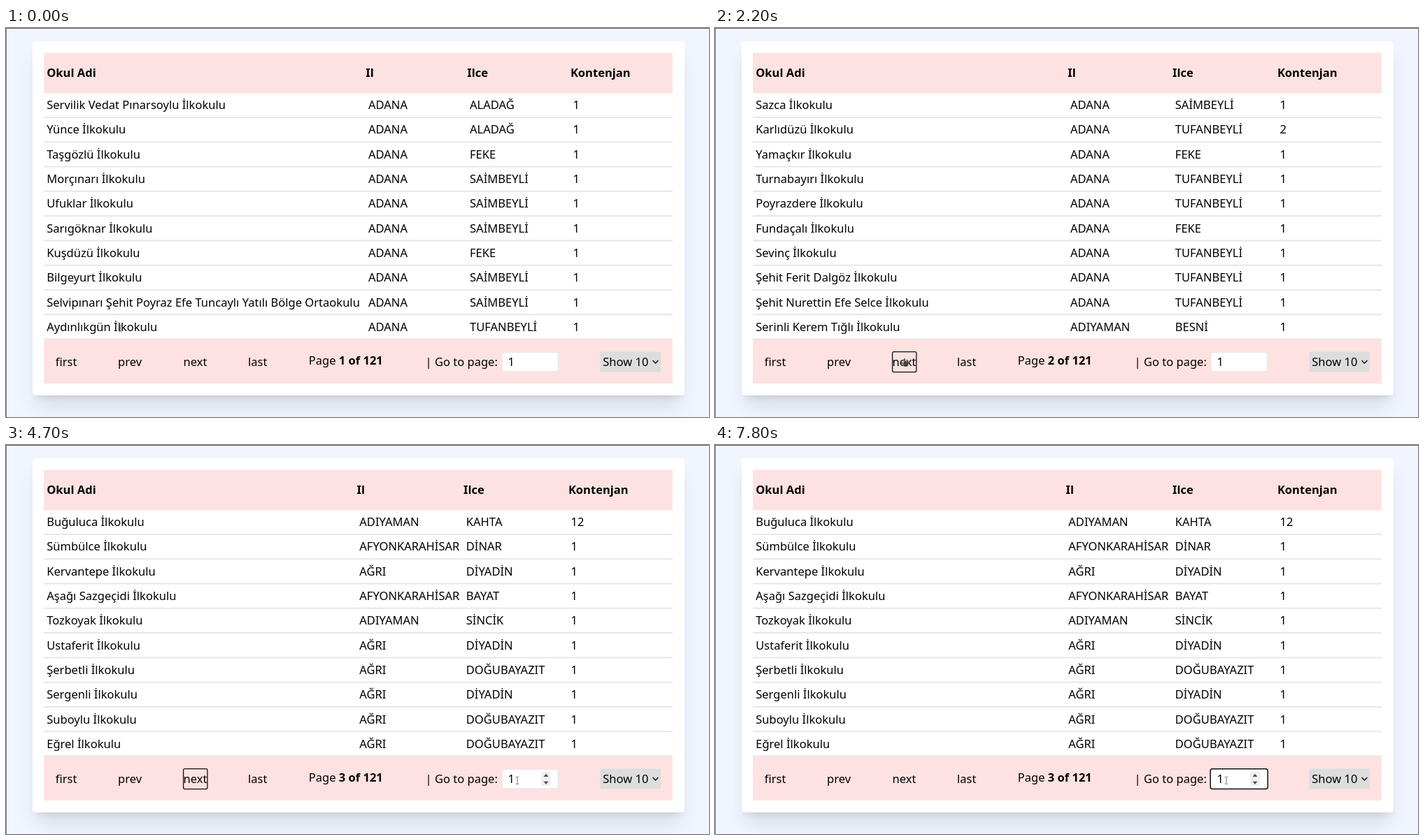
Animation, 1005 px wide and 557 px high, one loop 8000 ms. Source, as an HTML page:

```html
<!DOCTYPE html>
<html lang="tr">
<head>
<meta charset="utf-8">
<title>Okul tablosu</title>
<style>
html, body { margin: 0; width: 100%; height: 100%; overflow: hidden; background: #f0f5ff; }
#stage { position: absolute; left: 0; top: 0; width: 1005px; height: 557px; overflow: hidden; }
#card {
  position: absolute; left: 37.5px; top: 18.5px; width: 932px; height: 507.5px;
  border-radius: 4px; background: #fff;
  box-shadow: 0 21px 26px -5px rgba(0,0,0,.1), 0 8px 10px -6px rgba(0,0,0,.1);
}
svg { position: absolute; left: 0; top: 0; }
text { font: 16.55px "Noto Sans", "Open Sans", sans-serif; fill: #000; white-space: pre; }
.b { font-weight: 700; }
</style>
</head>
<body>
<div id="stage">
  <div id="card"></div>
  <svg id="svg" width="1005" height="557" viewBox="0 0 1005 557">
    <path d="M0 .5H1005" stroke="#5c5d60"/>
    <path d="M.5 0V557" stroke="#77787d"/>
    <rect x="54" y="35.5" width="899" height="58" fill="#fee2e2"/>
    <g id="lines" stroke="#e5e7eb" stroke-width="2"></g>
    <rect x="54" y="446" width="899" height="63" fill="#fee2e2"/>
    <g id="pages"></g>
    <text x="70.7" y="484">first</text>
    <text x="160" y="484">prev</text>
    <text x="253.5" y="484">next</text>
    <text x="346" y="484">last</text>
    <text x="432.7" y="481.8">Page <tspan class="b" id="count"></tspan></text>
    <text x="599.5" y="484">| Go to page:</text>
    <rect id="ring" x="253.6" y="463.6" width="34.3" height="29" rx="2" fill="none" stroke="#101010" stroke-width="1.3"/>
    <rect id="field" x="709" y="464.5" width="80.5" height="27.3" rx="3" fill="#fff" stroke="#e5e7eb" stroke-width="1.2"/>
    <rect id="focus" x="708.2" y="463.7" width="82" height="28.8" rx="3" fill="#fff" stroke="#101010" stroke-width="1.5"/>
    <g id="spin">
      <rect x="765" y="468" width="14" height="20" fill="#f0f0f0"/>
      <path d="M768.5 475L772 470.8L775.5 475ZM768.5 481.8L772 486L775.5 481.8Z" fill="#505050"/>
    </g>
    <text x="717.5" y="484">1</text>
    <path id="caret" d="M727.2 467V488.5" stroke="#000" stroke-width="1.3"/>
    <rect x="849.5" y="463.5" width="86.5" height="29" fill="#dddddd"/>
    <text x="853.3" y="484">Show 10</text>
    <path d="M924.5 476L928.5 480L932.5 476" fill="none" stroke="#111" stroke-width="1.5"/>
    <g id="cursor">
      <path id="beam" d="M-2.3 -5H-.7L0 -4.4L.7 -5H2.3M0 -4.4V4.4M-2.3 5H-.7L0 4.4L.7 5H2.3" fill="none" stroke="#777"/>
      <path id="arrow" d="M0 0V8.6L2 6.9L3.4 10L4.9 9.3L3.5 6.3H6.2Z" fill="#444" stroke="#fff" stroke-opacity=".6" stroke-width=".6"/>
      <path id="hand" d="M-2.2 -6C-1.2 -6.4 -.6 -5.8 -.6 -5V-2.4L3.4 -1.6Q4.6 -1.2 4.4 0L3.8 3.4L3 6H-2.2L-4.2 2.4Q-5 .6 -4 .3L-2.8 1.3V-5Q-2.8 -5.7 -2.2 -6Z" fill="#444" stroke="#fff" stroke-opacity=".6" stroke-width=".6"/>
    </g>
  </svg>
</div>
<script>
const LOOP = 8000;
const $ = id => document.getElementById(id);

// Each page: x of columns 2-4, then rows "school|province|district|quota".
const PAGES = [
  { cols: [518, 663, 810.6], rows: `Servilik Vedat Pınarsoylu|ADANA|ALADAĞ|1
Yünce|ADANA|ALADAĞ|1
Taşgözlü|ADANA|FEKE|1
Morçınarı|ADANA|SAİMBEYLİ|1
Ufuklar|ADANA|SAİMBEYLİ|1
Sarıgöknar|ADANA|SAİMBEYLİ|1
Kuşdüzü|ADANA|FEKE|1
Bilgeyurt|ADANA|SAİMBEYLİ|1
Selvipınarı Şehit Poyraz Efe Tuncaylı Yatılı Bölge Ortaokulu|ADANA|SAİMBEYLİ|1
Aydınlıkgün|ADANA|TUFANBEYLİ|1` },
  { cols: [508, 657.8, 807.6], rows: `Sazca|ADANA|SAİMBEYLİ|1
Karlıdüzü|ADANA|TUFANBEYLİ|2
Yamaçkır|ADANA|FEKE|1
Turnabayırı|ADANA|TUFANBEYLİ|1
Poyrazdere|ADANA|TUFANBEYLİ|1
Fundaçalı|ADANA|FEKE|1
Sevinç|ADANA|TUFANBEYLİ|1
Şehit Ferit Dalgöz|ADANA|TUFANBEYLİ|1
Şehit Nurettin Efe Selce|ADANA|TUFANBEYLİ|1
Serinli Kerem Tığlı|ADIYAMAN|BESNİ|1` },
  { cols: [505.3, 657.8, 807.6], rows: `Buğuluca|ADIYAMAN|KAHTA|12
Sümbülce|AFYONKARAHİSAR|DİNAR|1
Kervantepe|AĞRI|DİYADİN|1
Aşağı Sazgeçidi|AFYONKARAHİSAR|BAYAT|1
Tozkoyak|ADIYAMAN|SİNCİK|1
Ustaferit|AĞRI|DİYADİN|1
Şerbetli|AĞRI|DOĞUBAYAZIT|1
Sergenli|AĞRI|DİYADİN|1
Suboylu|AĞRI|DOĞUBAYAZIT|1
Eğrel|AĞRI|DOĞUBAYAZIT|1` }
];
const HEADS = ["Okul Adi", "Il", "Ilce", "Kontenjan"];

// Pointer path: time, x, y
const PATH = [
  [100, 163.5, 430], [300, 159.5, 433], [500, 175, 447], [800, 230, 470],
  [1000, 260, 479], [1200, 272.5, 479], [3200, 272.5, 479], [3400, 284, 492],
  [3700, 370, 503], [4000, 477, 488], [4100, 512, 493], [4300, 590, 496],
  [4500, 690, 485], [4700, 731, 480.3]
];

function make(tag, attrs, parent, text) {
  const el = document.createElementNS("http://www.w3.org/2000/svg", tag);
  for (const k in attrs) el.setAttribute(k, attrs[k]);
  if (text) el.textContent = text;
  parent.appendChild(el);
  return el;
}

const tables = PAGES.map(({ cols, rows }) => {
  const g = make("g", {}, $("pages"));
  HEADS.forEach((h, i) =>
    make("text", { x: i ? cols[i - 1] - 3.7 : 58.2, y: 70.2, class: "b" }, g, h));
  rows.split("\n").forEach((row, r) => {
    row.split("|").forEach((cell, i) => {
      const full = i || cell.endsWith("Ortaokulu") ? cell : cell + " İlkokulu";
      make("text", { x: i ? cols[i - 1] : 58.2, y: 116.1 + r * 35.32 }, g, full);
    });
  });
  return g;
});
for (let i = 0; i < 10; i++) {
  const y = 128 + i * 35.28;
  make("path", { d: `M54 ${y}H953` }, $("lines"));
}

const show = (el, on) => el.setAttribute("visibility", on ? "visible" : "hidden");

function pointAt(t) {
  let i = PATH.findIndex(p => p[0] > t);
  if (i < 0) return PATH[PATH.length - 1].slice(1);
  if (i === 0) return PATH[0].slice(1);
  const [t0, x0, y0] = PATH[i - 1], [t1, x1, y1] = PATH[i];
  const k = (t - t0) / (t1 - t0);
  return [x0 + (x1 - x0) * k, y0 + (y1 - y0) * k];
}

function draw(ms) {
  const t = Math.floor(ms / 100) * 100;
  const page = t < 2200 ? 0 : t < 3100 ? 1 : 2;
  tables.forEach((g, i) => show(g, i === page));
  $("count").textContent = `${t < 2000 ? 1 : t < 3100 ? 2 : 3} of 121`;

  const [x, y] = pointAt(t);
  const inField = x > 709 && y > 464;
  const onNext = x > 253 && x < 288 && y > 463 && y < 493;
  const onText = inField || y < 438;
  $("cursor").setAttribute("transform", `translate(${x} ${y})`);
  show($("beam"), onText);
  show($("hand"), onNext);
  show($("arrow"), !onText && !onNext);

  const focused = t >= 6000;
  show($("ring"), t >= 1900 && !focused);
  show($("focus"), focused);
  show($("spin"), inField);
  show($("caret"), focused && Math.floor((t - 6000) / 600) % 2 === 0);
}

const start = performance.now();
function tick() {
  draw((performance.now() - start) % LOOP);
  requestAnimationFrame(tick);
}
tick();
</script>
</body>
</html>
```
